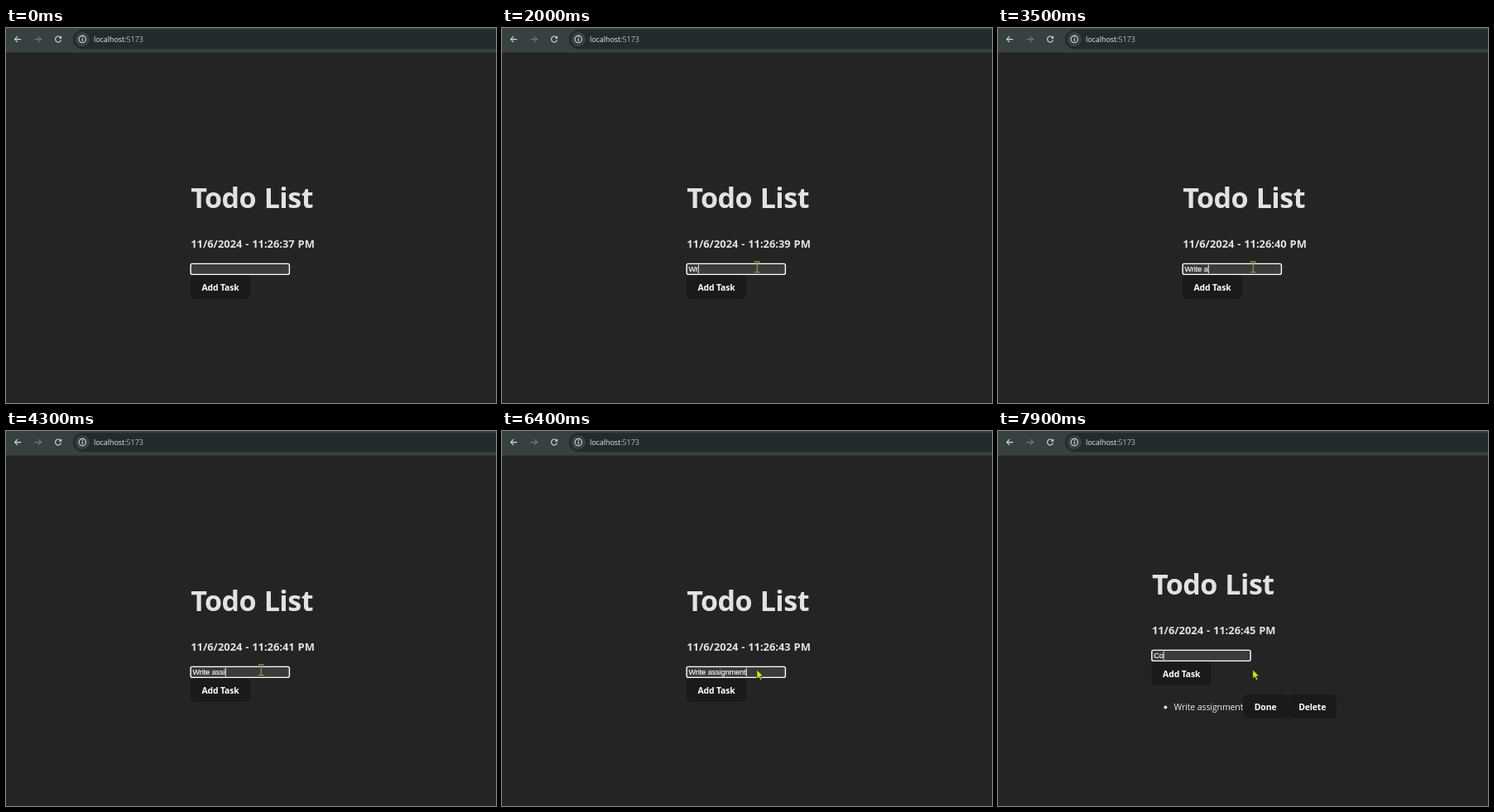
Recreate the animation shown at these times as an HTML page. Size 592 by 454 pixels, loop 8 s.

```html
<!DOCTYPE html>
<html lang="en">
<head>
<meta charset="utf-8">
<title>Todo List</title>
<style>
  html, body { margin: 0; width: 100%; height: 100%; overflow: hidden; background: #242424; }
  svg { display: block; width: 100vw; height: 100vh; }
  text { font-family: "Open Sans", "Noto Sans", sans-serif; fill: #e2e2e2; white-space: pre; }
  .title { font-size: 34px; font-weight: 700; letter-spacing: -.5px; word-spacing: 1.2px; }
  .clock { font-size: 12.9px; font-weight: 700; word-spacing: .5px; }
  .label { font-size: 10.4px; font-weight: 700; letter-spacing: -.12px; text-anchor: middle; fill: #fff; }
  .item { font-size: 10.5px; letter-spacing: -.1px; fill: #f0f0f0; }
  .url { font-size: 9.1px; letter-spacing: -.1px; fill: #e6eaea; }
  .typed { font: 9px "Liberation Sans", Arial, sans-serif; fill: #fff; stroke: #fff; stroke-width: .15px; }
  .icon { fill: none; stroke: #d3d9d9; stroke-width: 1.1; }
  .button { fill: #1a1a1a; }
</style>
</head>
<body>
<svg viewBox="0 0 592 454" xmlns="http://www.w3.org/2000/svg">
  <rect width="592" height="454" fill="#242424"/>

  <g id="toolbar">
    <rect width="592" height="29.7" fill="#384141"/>
    <rect x="81" y="2" width="540" height="23.4" rx="11.7" fill="#222c2c"/>
    <circle cx="92.3" cy="13.6" r="8.6" fill="#384242"/>
    <path class="icon" d="M18.2 13.6H10.6M14.1 10.1l-3.5 3.5 3.5 3.5"/>
    <path class="icon" style="stroke:#747d7d" d="M34.8 13.6h7.6M38.9 10.1l3.5 3.5-3.5 3.5"/>
    <path class="icon" d="M66 11.6A3.5 3.5 0 1 0 66.5 14.4M66.6 9.7v2.6h-2.6"/>
    <circle class="icon" cx="92.3" cy="13.6" r="4.2"/>
    <path class="icon" d="M92.3 13v3M92.3 11.1v1.2"/>
    <text class="url" x="106" y="17">localhost<tspan fill="#b4bcbc">:5173</tspan></text>
  </g>

  <g id="form">
    <text class="title" x="223.2" y="218.4">Todo List</text>
    <text class="clock" id="clock" x="223.2" y="265.7"></text>
    <rect class="button" x="223" y="299" width="72" height="29" rx="5.4"/>
    <text class="label" x="259" y="317.9">Add Task</text>
    <rect x="223.1" y="285.4" width="119.3" height="13" rx="1.8" fill="#3b3b3b" stroke="#fff" stroke-width="1.4"/>
    <text class="typed" id="typed" x="225.5" y="295"></text>
    <rect id="caret" y="286.6" width=".9" height="10.4" fill="#fff"/>
  </g>

  <g id="list">
    <circle cx="202.4" cy="334.5" r="2" fill="#f0f0f0"/>
    <text class="item" x="212.5" y="338.2">Write assignment</text>
    <rect class="button" x="296" y="319" width="54.3" height="29" rx="5.4"/>
    <rect class="button" x="350.3" y="319" width="58.7" height="29" rx="5.4"/>
    <text class="label" x="323.1" y="337.6">Done</text>
    <text class="label" x="379.7" y="337.6">Delete</text>
  </g>

  <path id="beam" fill="none" stroke="#8d8f3c" stroke-width="1.3"
        d="M304.8 283h2.4l1.1.8 1.1-.8h2.4M308.3 283.8v11M304.8 295.6h2.4l1.1-.8 1.1.8h2.4"/>
  <path id="arrow" fill="#dce60a" stroke="#20220a" stroke-width=".7"
        d="M307.8 289v10.8l2.4-2.2 1.8 4 1.9-.8-1.8-3.9 3.3-.2z"/>
</svg>
<script>
const LOOP = 8000, ADDED = 6500, BEAM_IN = 1000, ARROW_IN = 6400;
const TASK = "Write assignment", NEXT = "Co";
// Time of each key press
const taskKeys = [1600, 2000, 2100, 2300, 2700, 3000, 3500, 3900, 4100, 4300,
                  4700, 5400, 5600, 5800, 6000, 6200];
const nextKeys = [7700, 7900];
const caretOff = [[0, 100], [700, 1300], [5300, 5400], [6800, 7300]];

const el = id => document.getElementById(id);
const [form, clock, typed, caret, list, beam, arrow] =
  ["form", "clock", "typed", "caret", "list", "beam", "arrow"].map(el);

const show = (node, on) => node.setAttribute("visibility", on ? "visible" : "hidden");
const typedText = (text, keys, t) => text.slice(0, keys.filter(k => k <= t).length);

function setText(node, text) {
  if (node.textContent !== text) node.textContent = text;
}

function render(t) {
  const added = t >= ADDED;
  const seconds = 37 + Math.floor((t + 200) / 1000);
  setText(clock, `11/6/2024 - 11:26:${seconds} PM`);
  setText(typed, added ? typedText(NEXT, nextKeys, t) : typedText(TASK, taskKeys, t));
  caret.setAttribute("x", 225.5 + (typed.textContent ? typed.getComputedTextLength() : 0));
  show(caret, !caretOff.some(([from, to]) => t >= from && t < to));

  form.setAttribute("transform", added ? "translate(-37.3 -20)" : "");
  show(list, added);
  show(beam, t >= BEAM_IN && t < ARROW_IN);
  show(arrow, t >= ARROW_IN);
}

const start = performance.now();
function tick() {
  render((performance.now() - start) % LOOP);
  requestAnimationFrame(tick);
}
tick();
</script>
</body>
</html>
```
